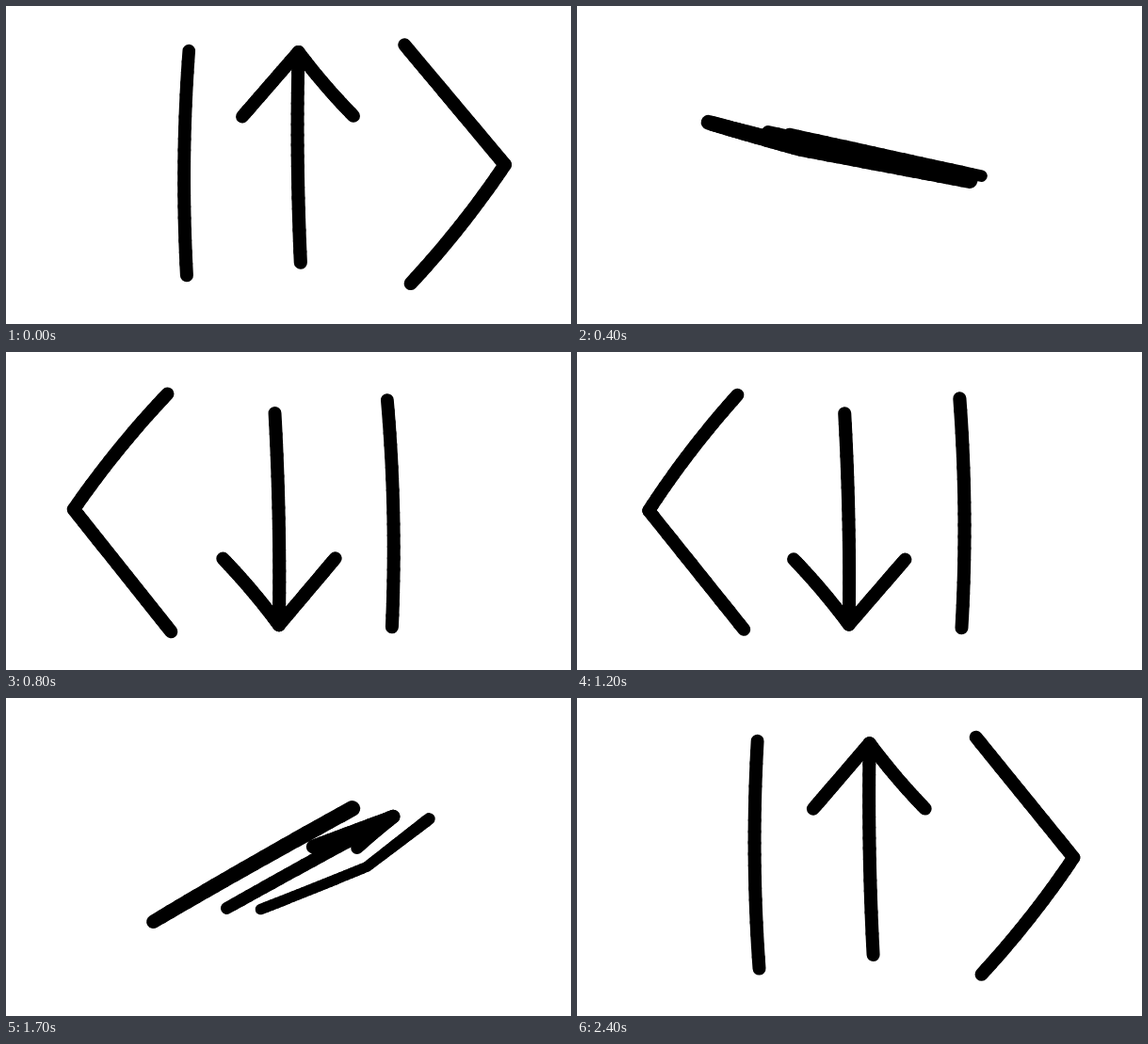
An HTML page with a canvas that plays this animation: 600x338 px, repeating every 2500 ms.

```html
<!DOCTYPE html>
<html lang="en">
<head>
<meta charset="utf-8">
<title>Spinning ket</title>
<style>
  html, body { margin: 0; width: 100%; height: 100%; overflow: hidden; background: #fff; }
  canvas { display: block; width: 600px; height: 338px; }
</style>
</head>
<body>
<canvas width="600" height="338"></canvas>
<script>
const canvas = document.querySelector('canvas');
const ctx = canvas.getContext('2d');
const LOOP = 2500, STEP = 100;
const VIEW_DISTANCE = 800, PLANE_OFFSET = 14, STROKE = 14, PIECES = 20;

const point = (x, y) => ({ x, y });
const clamp = u => Math.min(1, Math.max(0, u));
const sigmoid = x => 1 / (1 + Math.exp(-x));

function smooth(u) {
  const edge = sigmoid(-5);
  return (sigmoid(10 * (clamp(u) - 0.5)) - edge) / (1 - 2 * edge);
}

function quadInOut(u) {
  u = clamp(u);
  return u < 0.5 ? 2 * u * u : 1 - 2 * (1 - u) ** 2;
}

// Two half turns per loop; the first one begins just before the loop point.
function angleAt(t) {
  const firstTurn = time => smooth((time + 196) / 1130);
  const secondTurn = quadInOut((t - 1120) / 1000);
  return Math.PI * (firstTurn(t) + secondTurn + firstTurn(t - LOOP));
}

// Equal turns about x and then y, followed by perspective.
function project({ x, y }, angle) {
  const c = Math.cos(angle), s = Math.sin(angle), h = PLANE_OFFSET;
  const depth = x * s + y * c * s + h * (c * c - 1);
  const scale = VIEW_DISTANCE / (VIEW_DISTANCE - depth);
  return {
    x: canvas.width / 2 + scale * (x * c - y * s * s - h * s * c),
    y: canvas.height / 2 + scale * (y * c - h * s),
    scale
  };
}

// A parabolic arc that swells sideways by `bow` at its middle.
function arcPoint(start, end, bow, u) {
  const dx = end.x - start.x, dy = end.y - start.y;
  const swell = bow * 4 * u * (1 - u) / Math.hypot(dx, dy);
  return point(start.x + dx * u - dy * swell, start.y + dy * u + dx * swell);
}

function drawArc(angle, start, end, bow = 0) {
  let from = project(start, angle);
  for (let i = 1; i <= PIECES; i++) {
    const to = project(arcPoint(start, end, bow, i / PIECES), angle);
    ctx.lineWidth = STROKE * (from.scale + to.scale) / 2;
    ctx.beginPath();
    ctx.moveTo(from.x, from.y);
    ctx.lineTo(to.x, to.y);
    ctx.stroke();
    from = to;
  }
}

function drawBar(angle) {
  drawArc(angle, point(-109, -124), point(-106, 119), 4);
}

function drawArrow(angle) {
  const tip = point(11, -121);
  drawArc(angle, tip, point(15, 104), 2);
  drawArc(angle, tip, point(tip.x - 60, tip.y + 70));
  drawArc(angle, tip, point(tip.x + 59, tip.y + 70), 1.5);
}

function drawBracket(angle) {
  const corner = point(226, 1);
  drawArc(angle, corner, point(124, -127));
  drawArc(angle, corner, point(129, 124), -3);
}

function frame() {
  const t = Math.floor(performance.now() % LOOP / STEP) * STEP;
  const angle = angleAt(t);
  ctx.fillStyle = '#fff';
  ctx.fillRect(0, 0, canvas.width, canvas.height);
  ctx.strokeStyle = '#000';
  ctx.lineCap = 'round';
  drawBar(angle);
  drawArrow(angle);
  drawBracket(angle);
  requestAnimationFrame(frame);
}
frame();
</script>
</body>
</html>
```
